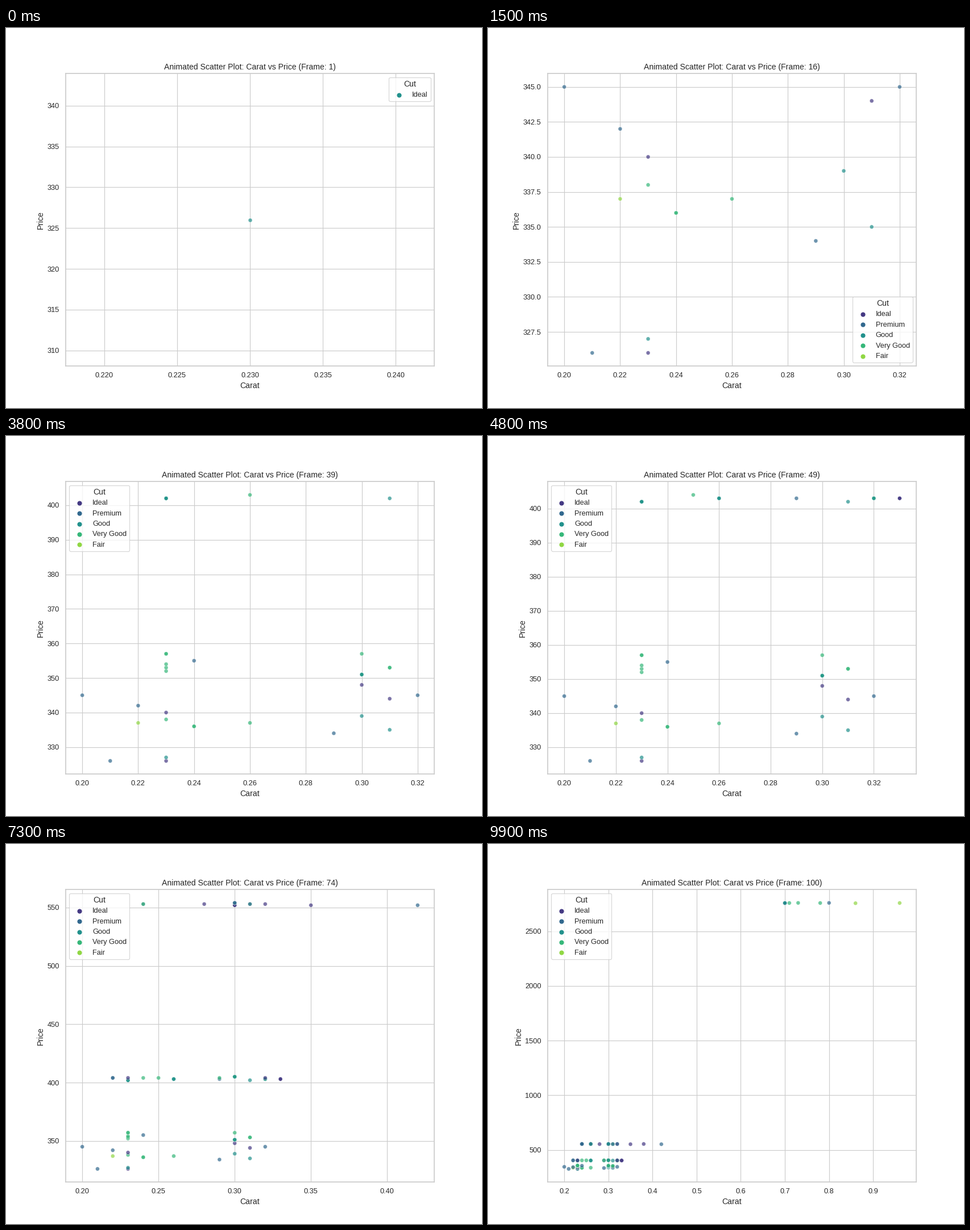
Write a matplotlib script that moves like this. It is 837x669 px and loops after 10000 ms.

```python
import matplotlib.pyplot as plt
import numpy as np
from matplotlib.animation import FuncAnimation

plt.rcParams.update({
    "font.family": "Liberation Sans",
    "text.color": ".15",
    "axes.labelcolor": ".15",
    "xtick.color": ".15",
    "ytick.color": ".15",
    "axes.edgecolor": ".8",
    "axes.linewidth": 1.5,
    "axes.axisbelow": True,
    "axes.grid": True,
    "grid.color": ".8",
    "grid.linewidth": 1,
    "axes.titlesize": 12,
    "axes.labelsize": 12,
    "xtick.labelsize": 11,
    "ytick.labelsize": 11,
    "xtick.bottom": False,
    "ytick.left": False,
    "xtick.major.size": 6,
    "ytick.major.size": 6,
    "legend.fontsize": 11,
    "legend.title_fontsize": 12,
})

CUTS = ["Ideal", "Premium", "Good", "Very Good", "Fair"]
I, P, G, V, F = range(5)

# The first hundred diamonds: (cut, carat) listed under each price
DIAMONDS = {
    326: [(I, .23), (P, .21)],
    327: [(G, .23)],
    334: [(P, .29)],
    335: [(G, .31)],
    336: [(V, .24)] * 2,
    337: [(V, .26), (F, .22)],
    338: [(V, .23)],
    339: [(G, .30)],
    340: [(I, .23)],
    342: [(P, .22)],
    344: [(I, .31)],
    345: [(P, .20), (P, .32)],
    348: [(I, .30)],
    351: [(G, .30)] * 2 + [(V, .30), (G, .30)],
    352: [(V, .23)],
    353: [(V, .23)] + [(V, .31)] * 2,
    354: [(V, .23)],
    355: [(P, .24)],
    357: [(V, .30)] + [(V, .23)] * 2,
    402: [(V, .23)] * 5 + [(G, .23)] * 2 + [(G, .31)],
    403: [(V, .26)] + [(I, .33)] * 3 + [(G, .26)] * 2
         + [(G, .32), (P, .29), (V, .32), (G, .32)],
    404: [(V, .25), (V, .29), (V, .24), (I, .23), (I, .32)] + [(P, .22)] * 2,
    405: [(I, .30), (P, .30)] + [(V, .30)] * 2 + [(G, .30)],
    552: [(I, .35), (P, .30)] + [(I, .30)] * 2 + [(P, .42)],
    553: [(I, .28), (I, .32), (V, .31), (P, .31), (P, .24), (V, .24)],
    554: [(V, .30)] + [(P, .30)] * 2 + [(G, .30)] + [(V, .26)] * 7
         + [(I, .26), (I, .38), (G, .26)] + [(P, .24)] * 4 + [(P, .32)],
    2757: [(I, .70), (F, .86), (I, .70)],
    2759: [(V, .71), (V, .78)] + [(G, .70)] * 2 + [(F, .96)],
    2760: [(V, .73), (P, .80)],
}

cut, carat, price = (np.array(col) for col in zip(
    *[(c, w, p) for p, stones in DIAMONDS.items() for c, w in stones]))

fig, ax = plt.subplots(figsize=(10.0001, 7.993), dpi=83.7)


def palette(n):
    return plt.cm.viridis(np.linspace(0, 1, n + 2)[1:-1])[:, :3]


def update(i):
    n = i + 1
    ax.clear()
    # Cuts first appear in index order, so the highest one gives the count
    colors = palette(cut[:n].max() + 1)
    ax.scatter(carat[:n], price[:n], s=36, c=colors[cut[:n]], alpha=.7,
               edgecolors="w", linewidths=.48)
    for name, color in zip(CUTS, colors):
        ax.scatter([], [], s=36, color=[color], label=name)
    ax.legend(title="Cut", loc="best")
    ax.set_title(f"Animated Scatter Plot: Carat vs Price (Frame: {n})")
    ax.set_xlabel("Carat")
    ax.set_ylabel("Price")


anim = FuncAnimation(fig, update, frames=len(cut), interval=100, repeat=True)
plt.show()
```
